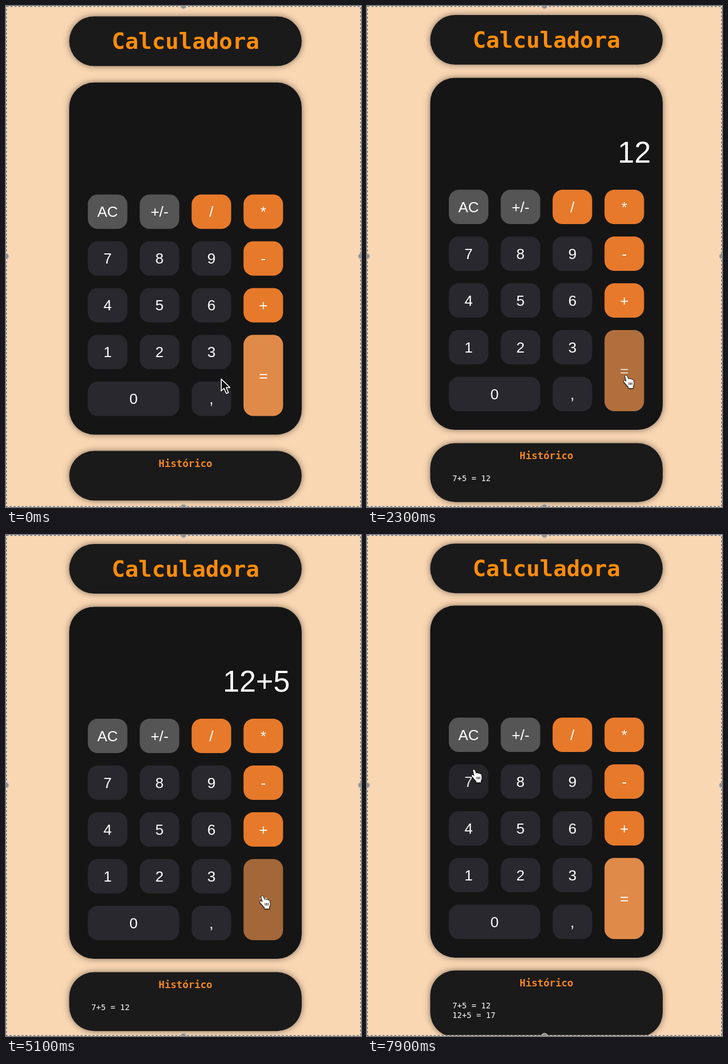
An HTML page with a canvas that plays this animation: 630 by 889 pixels, repeating every 8 s.

```html
<!DOCTYPE html>
<html lang="pt">
<head>
<meta charset="utf-8">
<title>Calculadora</title>
<style>
html, body { margin: 0; width: 100%; height: 100%; overflow: hidden; background: #fad7b3; }
canvas { display: block; width: 630px; height: 889px; }
</style>
</head>
<body>
<canvas></canvas>
<script>
const W = 630, H = 889, LOOP = 8000;
const canvas = document.querySelector('canvas');
const ctx = canvas.getContext('2d');
const dpr = window.devicePixelRatio || 1;
canvas.width = W * dpr;
canvas.height = H * dpr;

const SANS = '"Liberation Sans", Arial, sans-serif';
const MONO = '"DejaVu Sans Mono", monospace';
const DARK = '#28282e', GREY = '#555555', ORANGE = '#e7792b';

// Tops of the three panels and height of the last, per history length
const layouts = [
  { title: 18.5, body: 135.8, log: 789.6, logH: 87.8 },
  { title: 16, body: 127.4, log: 775.8, logH: 104.4 },
  { title: 15.2, body: 125.3, log: 772.8, logH: 118 }
];
const history = ['7+5 = 12', '12+5 = 17'];

const key = (label, col, row, color = DARK, cols = 1, rows = 1) => ({
  label, color,
  x: 145.2 + col * 92.1, y: 198.7 + row * 83,
  w: 70.2 + (cols - 1) * 92.1, h: 61 + (rows - 1) * 83
});
const keys = [
  key('AC', 0, 0, GREY), key('+/-', 1, 0, GREY), key('/', 2, 0, ORANGE), key('*', 3, 0, ORANGE),
  key('-', 3, 1, ORANGE), key('+', 3, 2, ORANGE), key('=', 3, 3, '#e08a49', 1, 2),
  key('0', 0, 4, DARK, 2), key(',', 2, 4)
];
for (let n = 1; n <= 9; n++) keys.push(key(String(n), (n - 1) % 3, 3 - Math.floor((n - 1) / 3)));

// Button down, button up, display afterwards
const presses = [
  [520, 620, '7'], [1000, 1080, '7+'], [1540, 1620, '7+5'], [2010, 2110, '12'],
  [3620, 3720, '12+'], [4300, 4560, '12+5'], [5060, 5160, '17'], [6220, 6320, '']
];

// Pointer stops: time, x, y
const path = [
  [0, 382, 662], [450, 192, 456], [620, 192, 456], [950, 440, 538], [1080, 440, 538],
  [1350, 297, 543], [1620, 297, 543], [1950, 457, 655], [2700, 457, 655],
  [3300, 436, 591], [3560, 440, 540], [3720, 440, 540], [4150, 294, 518], [4560, 294, 518],
  [4950, 452, 640], [5200, 452, 640], [5700, 354, 389], [6100, 192, 362],
  [7400, 190, 364], [7700, 188, 396], [7900, 187, 416]
];

function pointer(t) {
  const i = path.findIndex(p => p[0] > t);
  if (i < 1) return i < 0 ? path[path.length - 1].slice(1) : path[0].slice(1);
  const [t0, x0, y0] = path[i - 1], [t1, x1, y1] = path[i];
  const u = (t - t0) / (t1 - t0), e = u * u * (3 - 2 * u);
  return [x0 + (x1 - x0) * e, y0 + (y1 - y0) * e];
}

const entries = t => (t >= 5160 ? 2 : t >= 2110 ? 1 : 0);

function keyAt(t) {
  const [x, y] = pointer(t), top = layouts[entries(t)].body;
  return keys.find(k => x >= k.x && x <= k.x + k.w && y >= top + k.y && y <= top + k.y + k.h);
}

// Linear 200 ms fade towards the hovered or pressed opacity
function opacity(k, t) {
  let sum = 0;
  for (let i = 0; i < 20; i++) {
    const s = Math.max(0, t - i * 10);
    const down = presses.some(p => s >= p[0] && s < p[1]);
    sum += keyAt(s) !== k ? 1 : down ? 0.5 : 0.77;
  }
  return sum / 20;
}

function box(x, y, w, h, r, color) {
  ctx.beginPath();
  ctx.roundRect(x, y, w, h, r);
  ctx.fillStyle = color;
  ctx.fill();
}

function panel(y, h, color) {
  ctx.save();
  ctx.shadowColor = 'rgba(0,0,0,0.5)';
  ctx.shadowBlur = 12 * dpr;
  box(112.2, y, 412.6, h, 44, color);
  ctx.restore();
}

function text(str, x, y, font, color, align = 'center') {
  ctx.font = font;
  ctx.fillStyle = color;
  ctx.textAlign = align;
  ctx.fillText(str, x, y);
}

function frame() {
  ctx.strokeStyle = '#f4e6d8';
  ctx.lineWidth = 2;
  ctx.strokeRect(0.5, 0.5, W - 1, H - 1);
  ctx.strokeStyle = '#737373';
  ctx.lineWidth = 1.5;
  ctx.setLineDash([4, 3]);
  ctx.strokeRect(0.75, 0.75, W - 1.5, H - 1.5);
  ctx.setLineDash([]);
  for (const [x, y] of [[315, 0], [0, 444], [W, 444], [315, H]]) {
    ctx.beginPath();
    ctx.arc(x, y, 5, 0, 7);
    ctx.fillStyle = '#8f8f8f';
    ctx.fill();
    ctx.strokeStyle = '#c9c1b8';
    ctx.lineWidth = 1.2;
    ctx.stroke();
  }
}

const arrow = new Path2D('M0 0V21L5 16.4L9 25.5L12.6 24L8.8 15H15.4Z');
const hand = new Path2D('M1 1.6Q2.6-.6 4.4 1.6L7 8V7Q8.6 5.4 10 7.4Q11.8 6 13 8.2Q15.4 7.4 16 10L16.6 15Q16.4 18 15 20V23H7V20.8Q4 18 1 14Q-2.4 11.4-.8 10Q.8 9 3.4 11.6Z');
const fingers = new Path2D('M8 13V17.6M10.6 13V17.6M13.2 13V17.6');

function cursor(t) {
  const [x, y] = pointer(t), over = keyAt(t);
  ctx.save();
  ctx.translate(x, y);
  ctx.lineJoin = 'round';
  ctx.shadowColor = 'rgba(0,0,0,0.4)';
  ctx.shadowBlur = 2 * dpr;
  ctx.shadowOffsetY = dpr;
  ctx.fillStyle = over ? '#fff' : '#111';
  ctx.strokeStyle = over ? '#111' : '#fff';
  ctx.lineWidth = over ? 1.6 : 1.5;
  const shape = over ? hand : arrow;
  ctx.stroke(shape);
  ctx.fill(shape);
  ctx.shadowColor = 'transparent';
  if (over) {
    ctx.lineWidth = 1.1;
    ctx.stroke(fingers);
  } else {
    ctx.stroke(shape);
  }
  ctx.restore();
}

function draw(t) {
  const count = entries(t), at = layouts[count];
  ctx.setTransform(dpr, 0, 0, dpr, 0, 0);
  ctx.fillStyle = '#fad7b3';
  ctx.fillRect(0, 0, W, H);

  panel(at.title, 88, '#1a1a1a');
  text('Calculadora', 318.5, at.title + 57.5, `bold 39.6px ${MONO}`, '#ff8c0a');

  panel(at.body, 624.6, '#151515');
  const last = presses.filter(p => p[1] <= t).pop();
  if (last) text(last[2], 503.8, at.body + 150.4, `52.8px ${SANS}`, '#fff', 'right');
  for (const k of keys) {
    const y = at.body + k.y;
    ctx.globalAlpha = opacity(k, t);
    box(k.x, y, k.w, k.h, 17.6, k.color);
    text(k.label, k.x + k.w / 2, y + k.h / 2 + 9.2, `26.4px ${SANS}`, '#fff');
  }
  ctx.globalAlpha = 1;

  panel(at.log, at.logH, '#1a1a1a');
  text('Histórico', 318.5, at.log + 28, `bold 17.6px ${MONO}`, '#f5871f');
  history.slice(0, count).forEach((line, i) =>
    text(line, 151.5, at.log + 67.3 + i * 16.5, `14.1px ${MONO}`, '#fff', 'left'));

  frame();
  cursor(t);
}

const start = performance.now();
function tick() {
  draw((performance.now() - start) % LOOP);
  requestAnimationFrame(tick);
}
tick();
</script>
</body>
</html>
```
